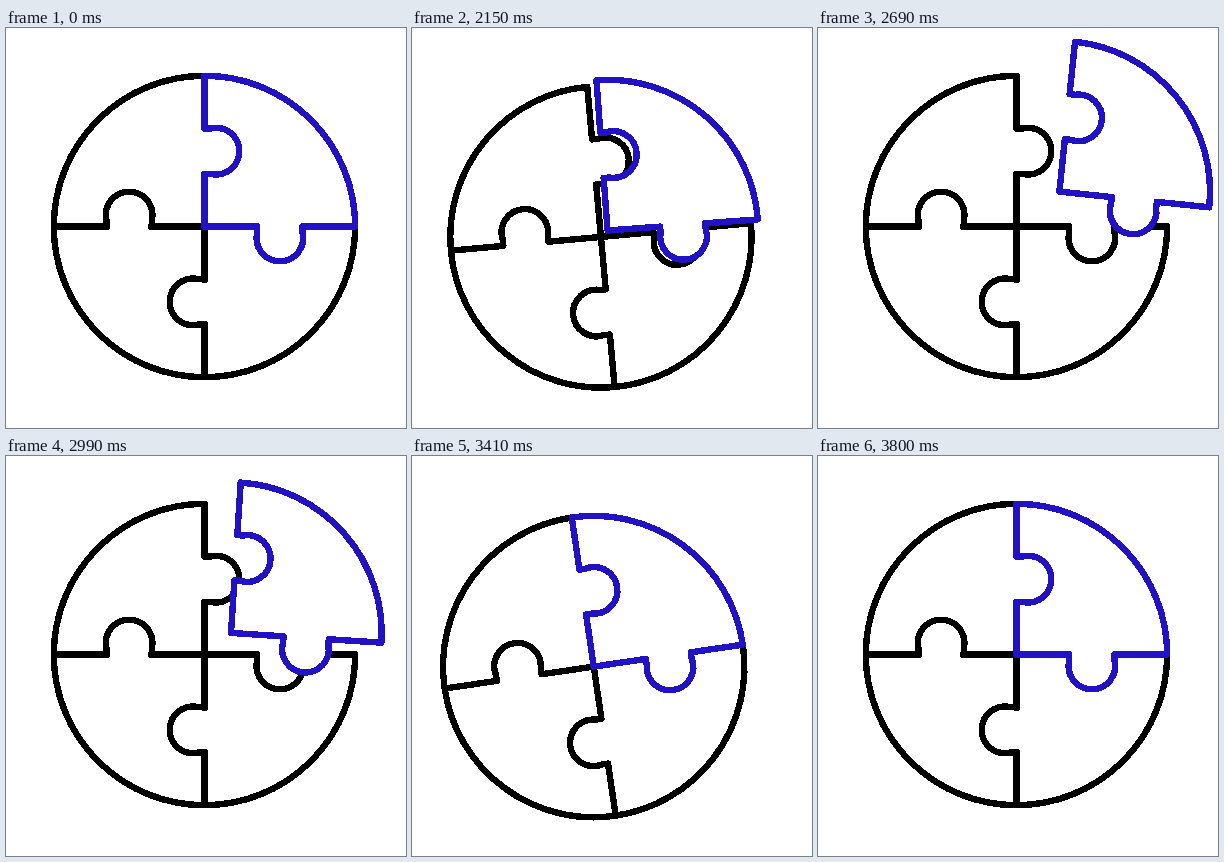
These frames come from a looping animation (400x400 px, 3.83 s). An HTML page:

```html
<!DOCTYPE html>
<html lang="en">
<head>
<meta charset="utf-8">
<title>Puzzle circle</title>
<style>
  html, body { margin: 0; width: 100%; height: 100%; overflow: hidden; background: #fff; }
  svg { display: block; width: 100vw; height: 100vh; }
</style>
</head>
<body>
<svg viewBox="0 0 400 400" fill="none" stroke="#000" stroke-width="6.4" stroke-linecap="round" stroke-linejoin="round" shape-rendering="crispEdges">
  <defs>
    <path id="seam" d="M0 0V-52.7H6A23.3 23.3 0 1 0 6 -98H0V-150.7"/>
  </defs>
  <g id="puzzle">
    <path d="M0 -150.7A150.7 150.7 0 1 0 150.7 0"/>
    <use href="#seam"/>
    <use href="#seam" transform="rotate(90)"/>
    <use href="#seam" transform="rotate(180)"/>
    <use href="#seam" transform="rotate(270)"/>
    <path id="joint" d="M-150 0H-98M-52.7 0H0V52.7M0 98V150"/>
    <path id="piece" fill="#fff" stroke="#2112c4"
      d="M0 0V-52.7H6A23.3 23.3 0 1 0 6 -98H0V-150.7A150.7 150.7 0 0 1 150.7 0H98V6A23.3 23.3 0 1 1 52.7 6V0Z"/>
  </g>
</svg>
<script>
const LOOP = 3830, REST = 2000, STEP = 30, CENTER = 198.5;
const [puzzle, piece, joint] = ["puzzle", "piece", "joint"].map(id => document.getElementById(id));

// Poses are [x, y, degrees].
const WINDUP = [-9.7, 10.6, -5.3];
const IMPACT = [-18, 13, -9];
const PULLED = [43, -35, 6];

const progress = (n, from, to) => Math.min(1, Math.max(0, (n - from) / (to - from)));
const scale = (pose, k) => pose.map(v => v * k);
const place = (el, [x, y, angle], origin = 0) =>
  el.setAttribute("transform", `translate(${origin + x} ${origin + y}) rotate(${angle})`);

function puzzlePose(n) {
  if (n < 9) return scale(WINDUP, Math.sin(Math.PI * n / 9));
  const push = Math.sin(Math.PI / 2 * progress(n, 38.75, 45));
  const settle = (1 - progress(n, 45, 60) ** 2) ** 4;
  return scale(IMPACT, push * settle);
}

function piecePose(n) {
  const out = 1 - (1 - progress(n, 4, 21)) ** 3;
  const back = 1 - progress(n, 22, 39.75) ** 2;
  return scale(PULLED, out * back);
}

function render(time) {
  const n = Math.max(0, Math.floor((time % LOOP - REST) / STEP));
  const pose = puzzlePose(n);
  place(puzzle, pose, CENTER);
  place(piece, piecePose(n));
  joint.setAttribute("stroke-width", Math.abs(pose[0]) < 0.1 ? 7.6 : 6.4);
}

const start = performance.now();
function tick() {
  render(performance.now() - start);
  requestAnimationFrame(tick);
}
tick();
</script>
</body>
</html>
```
